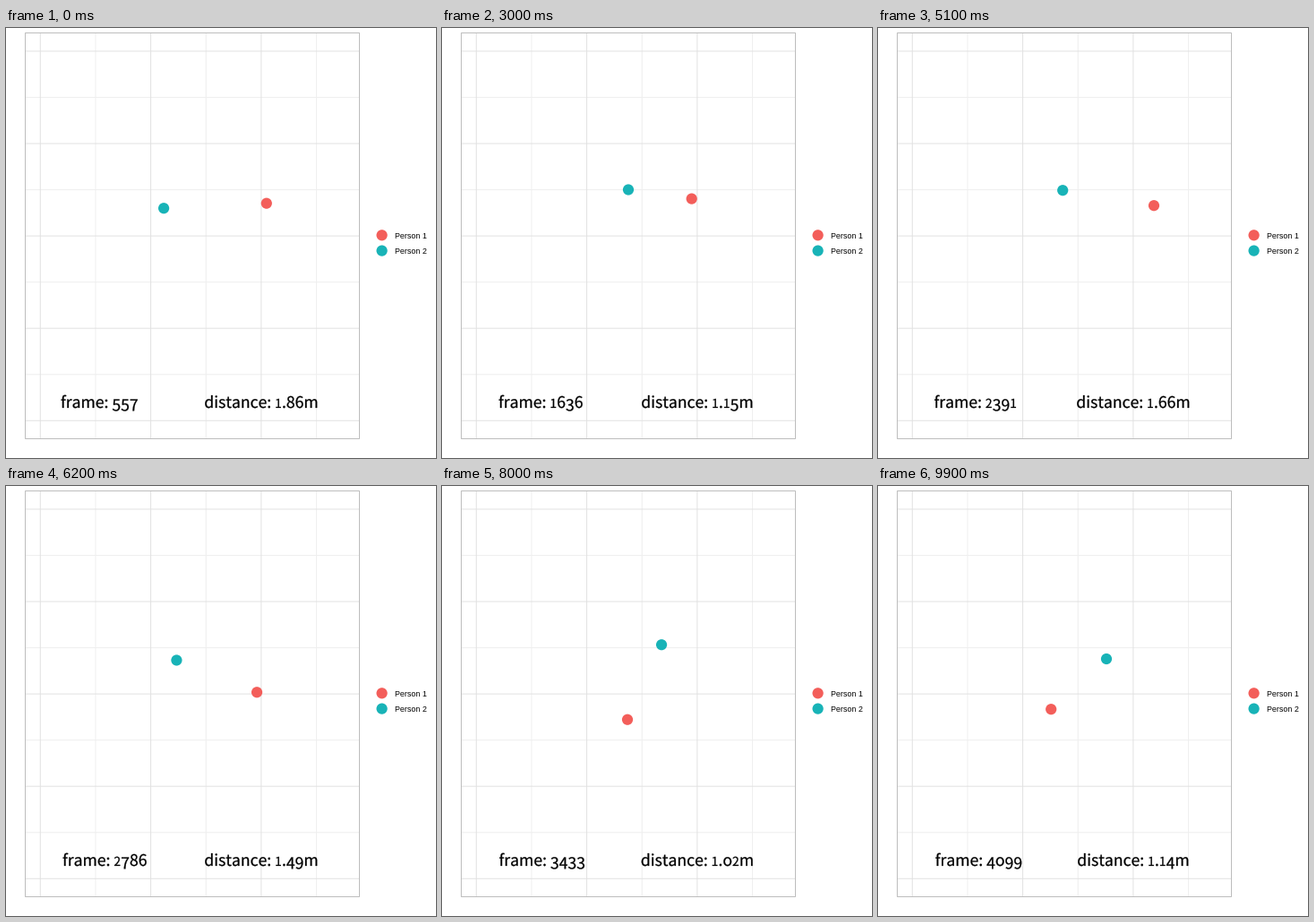
Recreate the animation shown at these times as a matplotlib script. Size 480 by 480 pixels, loop 10 s.

```python
import math
from functools import lru_cache

import matplotlib.pyplot as plt
import numpy as np
from matplotlib.animation import FuncAnimation
from matplotlib.patches import Circle, PathPatch, Rectangle
from matplotlib.path import Path
from matplotlib.textpath import TextPath

SIZE, DPI = 480, 100
PX = 72 / DPI  # points per pixel
STEPS, INTERVAL = 100, 100
RED, TEAL = "#f35e5a", "#18b3b7"
LEFT, TOP, RIGHT, BOTTOM = 21, 5, 394, 458
CELL_X, CELL_Y = 61.65, 51.55  # one metre across, half a metre down
FONT = {"family": "Noto Sans CJK JP"}
TEXT_PX = 17.6

# Key poses: step, then x, y of person 1 and of person 2
POSES = np.array([
    (0, 290.8, 195.7, 176.1, 201.2),
    (14, 275.9, 194.3, 207.4, 180),
    (30, 278.7, 190.6, 208, 180.5),
    (51, 308, 198.2, 206.2, 181.2),
    (72, 254.6, 256.3, 178, 207.7),
    (88, 191.3, 192.7, 280.3, 219.2),
    (99, 193.2, 249.2, 255, 193),
])
KEY_STEPS = POSES[:, 0]
ONE, TWO = (POSES[:, k] + 1j * POSES[:, k + 1] for k in (1, 3))
CENTRE, ARM = (ONE + TWO) / 2, (ONE - TWO) / 2
REACH, TURN = np.abs(ARM), np.unwrap(np.angle(ARM))


def pair(step):
    """Both people circle their common centre, easing from pose to pose."""
    k = np.interp(step, KEY_STEPS, np.arange(len(KEY_STEPS)))
    i, u = divmod(k, 1)
    k = i + u * u * (3 - 2 * u)
    centre, reach, turn = (np.interp(k, np.arange(len(v)), v)
                           for v in (CENTRE, REACH, TURN))
    arm = reach * np.exp(1j * turn)
    return centre + arm, centre - arm


def outline(text):
    return TextPath((0, 0), text, size=TEXT_PX, prop=FONT)


@lru_cache(None)
def glyph(ch):
    """Outline with y down, and its advance; digits become old-style."""
    ch = "o" if ch == "0" else ch
    advance = (outline(f"n{ch}n").get_extents().width
               - outline("nn").get_extents().width)
    path = outline(ch)
    verts = path.vertices * (1, -1)
    if ch in "12":
        verts, advance = verts * 0.78, advance * 0.8
    elif ch in "34579":
        verts = verts + (0, 0.19 * TEXT_PX)
    return verts, path.codes, advance


def label(text, x, y, hjust):
    glyphs = [glyph(c) for c in text]
    pen = x - hjust * sum(g[2] for g in glyphs)
    verts, codes = [], []
    for v, c, advance in glyphs:
        if len(v):
            verts.append(v + (pen, y))
            codes.append(c)
        pen += advance
    return Path(np.concatenate(verts), np.concatenate(codes))


fig = plt.figure(figsize=(SIZE / DPI, SIZE / DPI), dpi=DPI, facecolor="white")
ax = fig.add_axes([0, 0, 1, 1])
ax.set_xlim(0, SIZE)
ax.set_ylim(SIZE, 0)
ax.axis("off")

xs = 38.3 + CELL_X * np.arange(6)
ys = 25.9 + CELL_Y * np.arange(9)
for first, color in ((1, "#efefef"), (0, "#e2e2e2")):
    style = dict(color=color, lw=PX, zorder=1 - 0.1 * first, snap=False)
    ax.vlines(xs[first::2], TOP, BOTTOM, **style)
    ax.hlines(ys[first::2], LEFT, RIGHT, **style)
ax.add_patch(Rectangle((LEFT, TOP), RIGHT - LEFT, BOTTOM - TOP,
                       fill=False, ec="#bdbdbd", lw=PX, zorder=2))


def dot(x, y, color):
    return ax.add_patch(Circle((x, y), 6.1, fc=color, lw=0, zorder=3))


for y, color, name in ((231.3, RED, "Person 1"), (248.6, TEAL, "Person 2")):
    dot(419.6, y, color)
    ax.text(433.6, y + 3.6, name, family="Liberation Sans", fontsize=8.9 * PX,
            color="black", va="baseline")

dots = [dot(0, 0, color) for color in (RED, TEAL)]
counter, gap = [ax.add_patch(PathPatch(Path([(0, 0)]), fc="black", ec="black",
                                       lw=0.25 * PX, zorder=4))
                for _ in range(2)]


def draw(step):
    people = pair(step)
    for mark, p in zip(dots, people):
        mark.center = p.real, p.imag
    apart = people[0] - people[1]
    metres = math.hypot(apart.real / CELL_X, apart.imag / (2 * CELL_Y))
    count = min(math.ceil(557 + 35.95 * step), 4099)
    counter.set_path(label(f"frame: {count}", 38.5, 424, -0.26))
    gap.set_path(label(f"distance: {metres:.2f}m", 285, 424, 0.5))
    return *dots, counter, gap


anim = FuncAnimation(fig, draw, frames=STEPS, interval=INTERVAL,
                     repeat=True, repeat_delay=0, blit=False)
plt.show()
```
